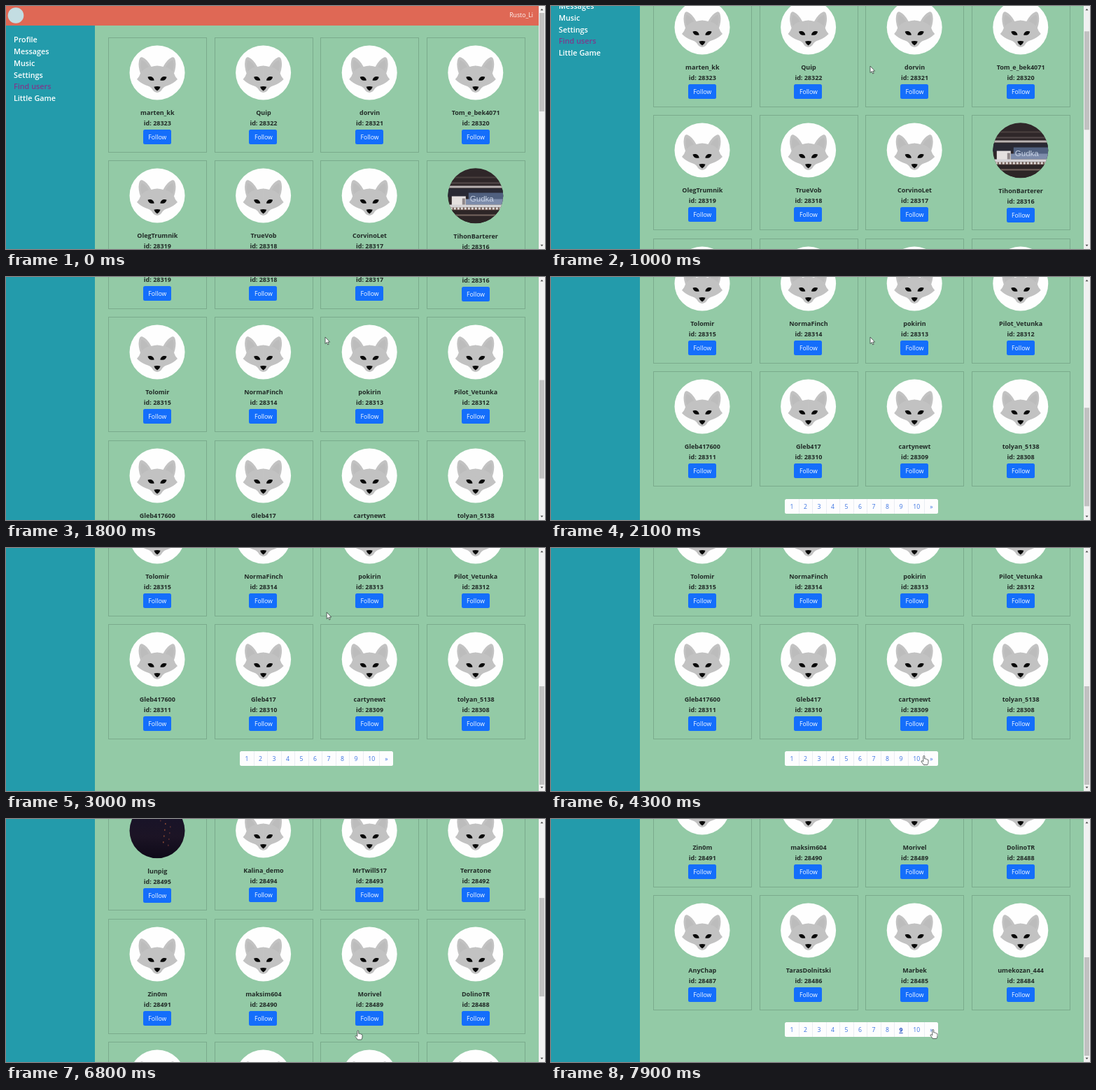
Write an HTML page with a canvas that moves like this. It is 770x348 px and loops after 8000 ms.

```html
<!DOCTYPE html>
<html lang="en">
<head>
<meta charset="utf-8">
<title>Find users</title>
<style>
  html, body { margin: 0; width: 770px; height: 348px; overflow: hidden; background: #93caa6; }
  canvas { display: block; }
</style>
</head>
<body>
<canvas id="stage" width="770" height="348"></canvas>
<script>
const ctx = document.getElementById('stage').getContext('2d');
const W = 770, H = 348, LOOP = 8000, STEP = 100, SWAP = 5500, MAX_SCROLL = 465;
const FONT = '"Open Sans", "Noto Sans", sans-serif';
const MENU = ['Profile', 'Messages', 'Music', 'Settings', 'Find users', 'Little Game'];

const PAGES = [
  { firstId: 28323, active: 0, photos: { 7: drawTrain }, users:
    ['marten_kk', 'Quip', 'dorvin', 'Tom_e_bek4071',
     'OlegTrumnik', 'TrueVob', 'CorvinoLet', 'TihonBarterer',
     'Tolomir', 'NormaFinch', 'pokirin', 'Pilot_Vetunka',
     'Gleb417600', 'Gleb417', 'cartynewt', 'tolyan_5138'] },
  { firstId: 28499, active: 9, photos: { 4: drawNight }, users:
    ['FomaKirado', 'Tsurebo', 'petyamolushin', 'darya815',
     'lunpig', 'Kalina_demo', 'MrTwill517', 'Terratone',
     'Zin0m', 'maksim604', 'Morivel', 'DolinoTR',
     'AnyChap', 'TarasDolnitski', 'Marbek', 'umekozan_444'] }
];

// [time, value...]
const SCROLL = [
  [[0, 0], [700, 0], [900, 36], [1400, 181], [2000, 420], [2100, 438.5], [2200, 441],
   [2800, 441], [3000, MAX_SCROLL]],
  [[5500, 0], [5800, 0], [5900, 4.7], [6100, 50], [6800, 255], [7200, MAX_SCROLL]]
];
const POINTER = [
  [0, 440, -16], [200, 440, -16], [700, 456, 86], [2900, 456, 86], [3900, 533, 297.5],
  [4300, 533, 297.5], [4900, 503, 303], [7300, 503, 303], [7800, 546, 301.5]
];

function sample(keys, t, i, ease) {
  let k = 0;
  while (k < keys.length - 1 && keys[k + 1][0] <= t) k++;
  const a = keys[k], b = keys[k + 1];
  if (!b) return a[i];
  let p = Math.max(0, (t - a[0]) / (b[0] - a[0]));
  if (ease) p = p * p * (3 - 2 * p);
  return a[i] + (b[i] - a[i]) * p;
}

function rect(color, x, y, w, h) {
  ctx.fillStyle = color;
  ctx.fillRect(x, y, w, h);
}

function roundRect(color, x, y, w, h, r) {
  ctx.fillStyle = color;
  ctx.beginPath();
  ctx.roundRect(x, y, w, h, r);
  ctx.fill();
}

function disc(color, x, y, rx, ry = rx) {
  ctx.fillStyle = color;
  ctx.beginPath();
  ctx.ellipse(x, y, rx, ry, 0, 0, 7);
  ctx.fill();
}

// y is the middle of the lowercase letters and digits
function text(str, x, y, size, weight, color, align = 'center') {
  ctx.font = `${weight} ${size}px ${FONT}`;
  ctx.fillStyle = color;
  ctx.textAlign = align;
  ctx.fillText(str, x, y + size * 0.36);
}

const HALF_FACE = new Path2D('M-.3 28.5Q5 28 7.5 23Q10 19.5 16 18Q23 15.5 29 9.5Q25.5 6 24 1' +
  'Q27.5 -9 26 -17Q25 -23 21 -22Q14 -19 8.5 -8.5Q4 -10 -.3 -10Z');
const EAR_SHADE = new Path2D('M22.5 -18Q25 -10 22 -2Q17 -7 12 -8Q16 -16 22.5 -18Z');
const EYE = new Path2D('M4.3 11Q5 7 9 5.6Q12 5 13.5 6.2Q12.5 10 9.5 11Q7 11.7 4.3 11Z');
const NOSE = new Path2D('M-4.6 20.3Q0 18.8 4.6 20.3Q3.5 24 0 26Q-3.5 24 -4.6 20.3Z');

function drawFox() {
  disc('#fefefe', 0, 0, 39.5, 39);
  for (const side of [-1, 1]) {
    ctx.save();
    ctx.scale(side, 1);
    ctx.fillStyle = '#c2c2c2';
    ctx.fill(HALF_FACE);
    ctx.fillStyle = '#bcbcbc';
    ctx.fill(EAR_SHADE);
    ctx.fillStyle = '#080808';
    ctx.fill(EYE);
    ctx.restore();
  }
  ctx.fillStyle = '#080808';
  ctx.fill(NOSE);
}

function drawTrain() {
  rect('#2f2729', -40, -40, 80, 80);
  rect('#4a403f', -40, -27, 80, 2);
  rect('#544a4b', -40, -19, 80, 2);
  rect('#b9b3b3', -40, -14, 80, 3);
  rect('#292934', -40, -10, 80, 12);
  rect('#50607f', -10, -4, 50, 10);
  rect('#7d8cab', -14, 5, 54, 8);
  rect('#e4e0df', -34, 1, 20, 18);
  rect('#8f8789', -19, 4, 4, 14);
  rect('#d5d3d6', -40, 13, 80, 4);
  rect('#6f5850', -40, 17, 80, 4);
  for (let x = -36; x < 40; x += 5) rect('#e0dbd9', x, 17, 3, 3);
  rect('#2d2526', -40, 21, 80, 19);
  rect('#77665f', -40, 27, 80, 2);
  ctx.font = '11.5px "Liberation Sans", Arial, sans-serif';
  ctx.fillStyle = '#c9d4e6';
  ctx.textAlign = 'center';
  ctx.fillText('Gudka', 9, 8);
}

function drawNight() {
  const g = ctx.createLinearGradient(0, -40, 0, 40);
  g.addColorStop(0, '#15122a');
  g.addColorStop(0.6, '#1c1425');
  g.addColorStop(1, '#0e0a18');
  rect(g, -40, -40, 80, 80);
  for (let i = 0; i < 9; i++)
    rect(i % 2 ? '#8f4c35' : '#5d3031', 4 + (i * 7) % 15, -15 + i * 4.4, 1.5, 2);
}

function drawCard(page, i, scroll) {
  const cx = 216.3 + (i % 4) * 151.6;
  const y = Math.round(45 + Math.floor(i / 4) * 176.3 - scroll);
  if (y > H || y < -170) return;
  const photo = page.photos[i];
  const drop = photo ? 1 : 0;

  ctx.strokeStyle = '#7aab8c';
  ctx.lineWidth = 1;
  ctx.strokeRect(Math.round(cx - 70.3) + 0.5, y + 0.5, 140, 164);

  ctx.save();
  ctx.translate(cx - 0.3, y + 50.5);
  if (photo) {
    ctx.beginPath();
    ctx.arc(0, 0.3, 39.5, 0, 7);
    ctx.clip();
    photo();
  } else drawFox();
  ctx.restore();

  text(page.users[i], cx, y + 107.5 + drop, 9, 700, '#212b27');
  text('id: ' + (page.firstId - i), cx, y + 123 + drop, 9, 700, '#212b27');
  roundRect('#146efb', Math.round(cx - 20.5), y + 132 + drop, 40, 21, 2.5);
  text('Follow', cx, y + 142.5 + drop, 8.7, 400, '#f8fbff');
}

function drawPager(page, scroll) {
  const y = Math.round(756 - scroll);
  if (y > H) return;
  roundRect('#fdfdfe', 334, y, 219, 21, 2.5);
  for (let i = 1; i <= 11; i++) {
    const x = i < 10 ? 324.5 + i * 19.5 : i === 10 ? 522.3 : 543.3;
    const on = i === page.active;
    if (i < 11) rect('#e9edf2', i < 10 ? Math.round(334 + i * 19.5) : 533, y, 1, 21);
    text(i < 11 ? String(i) : '»', x, y + 10.5, 8.7, on ? 700 : 400, on ? '#2b56c4' : '#3c74e2');
    if (on) rect('#2b56c4', x - 2.7, y + 15, 5.4, 1);
  }
}

function drawChrome(scroll) {
  rect('#239bab', 0, 0, 127, H);
  rect('#df6855', 0, -scroll, 761, 28);
  disc('#c3dde2', 14, 13.5 - scroll, 11.3);
  text('Rusto_Li', 753, 13 - scroll, 8.7, 400, '#fff8f6', 'right');
  MENU.forEach((label, i) =>
    text(label, 11, 48.3 + i * 16.8 - scroll, 10.8, 600, i === 4 ? '#7d3a8c' : '#fcffff', 'left'));
}

function triangle(x, y, d) {
  ctx.fillStyle = '#505050';
  ctx.beginPath();
  ctx.moveTo(x - 2, y + d);
  ctx.lineTo(x + 2, y + d);
  ctx.lineTo(x, y - d);
  ctx.fill();
}

function drawScrollbar(scroll) {
  rect('#f1f1f1', 761, 0, 9, H);
  rect('#c1c1c1', 762, 10 + scroll * 188 / MAX_SCROLL, 7, 141);
  triangle(765.5, 5, 1.2);
  triangle(765.5, 343, -1.2);
}

const ARROW = new Path2D('M0 0V9.6L2.2 7.6L3.7 11L5.2 10.3L3.7 7.1H6.6Z');
const HAND = new Path2D('M-1.2 1Q-1.2 0 -.2 0Q.8 0 .8 1V4.4Q2 3.8 2.7 4.8Q3.9 4.4 4.4 5.4' +
  'Q6 5.2 6 6.7V9Q6 11 4.8 13H-.8Q-2.2 10.6 -4 8.4Q-4 6.8 -2.4 7.4L-1.2 8.4Z');

function drawPointer(t) {
  ctx.save();
  ctx.translate(sample(POINTER, t, 1, true), sample(POINTER, t, 2, true));
  const shape = t >= 3800 ? HAND : ARROW;
  ctx.fillStyle = '#fff';
  ctx.fill(shape);
  ctx.strokeStyle = '#39433f';
  ctx.lineWidth = 0.8;
  ctx.stroke(shape);
  ctx.restore();
}

function draw(t) {
  const n = t < SWAP ? 0 : 1;
  const page = PAGES[n];
  const scroll = sample(SCROLL[n], t, 1);
  rect('#93caa6', 0, 0, W, H);
  drawChrome(scroll);
  page.users.forEach((_, i) => drawCard(page, i, scroll));
  drawPager(page, scroll);
  drawScrollbar(scroll);
  drawPointer(t);
}

function tick() {
  const t = performance.now() % LOOP;
  draw(Math.floor(t / STEP) * STEP);
  requestAnimationFrame(tick);
}
tick();
</script>
</body>
</html>
```
